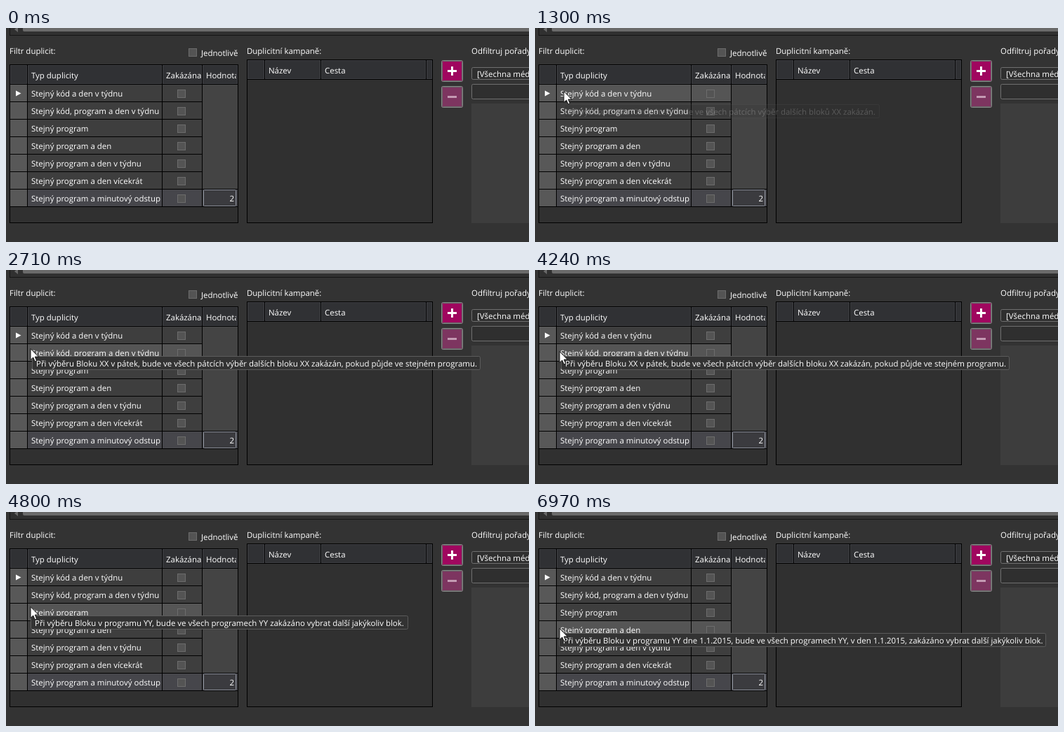
An HTML page for the animation above (8000 ms loop, 745 px wide and 306 px high).

```html
<!DOCTYPE html>
<html lang="cs">
<head>
<meta charset="utf-8">
<title>Filtr duplicit</title>
<style>
html, body { margin: 0; width: 100%; height: 100%; overflow: hidden; background: #333; }
svg { display: block; width: 745px; height: 306px; }
text { font: 11.45px "Open Sans", "Noto Sans", sans-serif; fill: #fff; text-rendering: geometricPrecision; white-space: pre; }
.check { fill: #545454; stroke: #6c6c6c; }
.field { fill: #2f2f2f; stroke: #707070; }
.head { fill: #303134; stroke: #3d3e42; }
.tip rect { fill: #333; stroke: #5c5c5c; }

.hover, .tip, #cursor, #thumbHot { animation: 8s step-end infinite; }
.hover, .tip, #thumbHot { opacity: 0; }
#cursor { animation-name: cursor; }
#thumbHot { animation-name: thumb; }
#hover0 { animation-name: hover0; }
#hover1 { animation-name: hover1; }
#hover2 { animation-name: hover2; }
#hover3 { animation-name: hover3; }
#tip0 { animation-name: tip0; }
#tip1 { animation-name: tip1; }
#tip2 { animation-name: tip2; }
#tip3 { animation-name: tip3; }

@keyframes thumb { 0%, 8% { opacity: 0 } 6.625% { opacity: 1 } 100% { opacity: 0 } }

@keyframes hover0 { 0%, 31.25%, 100% { opacity: 0 } 10.75% { opacity: 1 } }
@keyframes hover1 { 0%, 55.75%, 100% { opacity: 0 } 31.25% { opacity: 1 } }
@keyframes hover2 { 0%, 83.125%, 100% { opacity: 0 } 55.75% { opacity: 1 } }
@keyframes hover3 { 0% { opacity: 0 } 83.125%, 100% { opacity: 1 } }

@keyframes tip0 { 0%, 31.25%, 100% { opacity: 0 } 16.25% { opacity: .2 } 17.625% { opacity: .7 } 19% { opacity: 1 } }
@keyframes tip1 { 0%, 55.75%, 100% { opacity: 0 } 32.5% { opacity: .6 } 33.875% { opacity: 1 } }
@keyframes tip2 { 0%, 83.125%, 100% { opacity: 0 } 57.125% { opacity: .4 } 58.5% { opacity: .85 } 60% { opacity: 1 } }
@keyframes tip3 { 0% { opacity: 0 } 84.5% { opacity: .4 } 85.75% { opacity: .85 } 87.125%, 100% { opacity: 1 } }

@keyframes cursor {
  0% { transform: translate(-50px, 0) }
  2.375% { transform: translate(728px, 206px) }
  3.75% { transform: translate(560px, 90px) }
  5.125% { transform: translate(400px, 25px) }
  6.625% { transform: translate(230px, 3px) }
  8% { transform: translate(96px, 14px) }
  9.25% { transform: translate(60px, 52px) }
  10.75% { transform: translate(43px, 84px) }
  12% { transform: translate(41px, 90px) }
  13.5% { transform: translate(41px, 91px) }
  27.25% { transform: translate(41px, 95px) }
  28.625% { transform: translate(39px, 99px) }
  29.875% { transform: translate(38px, 103px) }
  31.25% { transform: translate(36px, 108px) }
  32.5% { transform: translate(35px, 111px) }
  33.875% { transform: translate(35px, 113px) }
  53% { transform: translate(35px, 117px) }
  54.375% { transform: translate(35px, 124px) }
  55.75% { transform: translate(35px, 131px) }
  57.125% { transform: translate(35px, 134px) }
  58.5% { transform: translate(35px, 135px) }
  60% { transform: translate(35px, 136px) }
  79% { transform: translate(35px, 140px) }
  80.375% { transform: translate(35px, 147px) }
  81.75% { transform: translate(35px, 153px) }
  83.125% { transform: translate(35px, 159px) }
  84.5% { transform: translate(35px, 163px) }
  85.75% { transform: translate(35px, 166px) }
  87.125%, 100% { transform: translate(35px, 167px) }
}
</style>
</head>
<body>
<svg id="stage" viewBox="0 0 745 306"></svg>
<script>
const rowNames = [
  "Stejný kód a den v týdnu",
  "Stejný kód, program a den v týdnu",
  "Stejný program",
  "Stejný program a den",
  "Stejný program a den v týdnu",
  "Stejný program a den vícekrát",
  "Stejný program a minutový odstup",
];
// left, top, right edge, text
const tips = [
  [41, 109, 491, "Při výběru Bloku XX v pátek, bude ve všech pátcích výběr dalších bloků XX zakázán."],
  [37, 123, 676, "Při výběru Bloku XX v pátek, bude ve všech pátcích výběr dalších bloku XX zakázán, pokud půjde ve stejném programu."],
  [35, 148, 573, "Při výběru Bloku v programu YY, bude ve všech programech YY zakázáno vybrat další jakýkoliv blok."],
  [34, 173, 728, "Při výběru Bloku v programu YY dne 1.1.2015, bude ve všech programech YY, v den 1.1.2015, zakázáno vybrat další jakýkoliv blok."],
];

const rect = (x, y, w, h, fill, extra = "") =>
  `<rect x="${x}" y="${y}" width="${w}" height="${h}" fill="${fill}" ${extra}/>`;
const box = (x, y, w, h, cls, r = 0) =>
  `<rect class="${cls}" x="${x + .5}" y="${y + .5}" width="${w - 1}" height="${h - 1}" rx="${r}"/>`;
const label = (x, y, s, extra = "") => `<text x="${x}" y="${y}" ${extra}>${s}</text>`;
const check = (x, y) => box(x, y, 12, 12, "check");

// Header cells lie between neighbouring edges, one dark pixel apart.
const header = (y, h, edges) =>
  edges.slice(1).map((right, i) => box(edges[i] + 1, y, right - edges[i] - 1, h, "head")).join("");

const cells = (y, fill) => rect(31, y, 191, 24, fill) + rect(223, y, 56, 24, fill);

const row = (name, i) => {
  const y = 81 + 25 * i;
  return rect(6, y, 24, 24, "#585858")
    + cells(y, i === 6 ? "#46464b" : "#3e3e3e")
    + (i < 4 ? `<g class="hover" id="hover${i}">${cells(y, "#555")}</g>` : "")
    + label(36, y + 17, name)
    + check(244, y + 7);
};

const filterTable = () =>
  rect(5, 52, 326, 227, "#000")
  + header(53, 27, [5, 30, 222, 279, 330])
  + rect(6, 256, 324, 22, "#303030")
  + rect(280, 81, 50, 149, "#444")
  + rect(280, 231, 50, 24, "#46464b")
  + rowNames.map(row).join("")
  + label(36, 72, "Typ duplicity") + label(228, 72, "Zakázána")
  + `<svg x="280" y="53" width="48" height="28">${label(5, 19, "Hodnota")}</svg>`
  + `<path d="M14 89.5l7.5 4-7.5 4z" fill="#fff"/>`
  + `<rect x="281.5" y="231.5" width="46" height="23" rx="1" fill="#3b3b3f" stroke="#8d919c"/>`
  + label(325, 248, "2", 'text-anchor="end"');

const campaignTable = () =>
  rect(343, 45, 265, 234, "#000")
  + header(46, 27, [343, 368, 448, 598, 607])
  + rect(344, 74, 263, 204, "#303030")
  + label(374, 65, "Název") + label(454, 65, "Cesta");

const button = (y, fill, ink, sign) =>
  `<rect x="620.5" y="${y + .5}" width="30" height="30" rx="2" fill="${fill}" stroke="#868686"/>`
  + `<rect x="621.5" y="${y + 1.5}" width="28" height="28" rx="1" fill="none" stroke="#666"/>`
  + `<path d="${sign}" transform="translate(635.5 ${y + 15.5})" stroke="${ink}" stroke-width="3"/>`;

const tip = ([x, y, right, s], i) =>
  `<g class="tip" id="tip${i}">${box(x, y, right - x, 20, "", 2)}${label(x + 6, y + 15, s)}</g>`;

document.getElementById("stage").innerHTML =
  rect(0, 0, 745, 306, "#333")
  + rect(5, 0, 740, 11, "#151515") + rect(6, 0, 739, 10, "#303030")
  + `<path d="M17 -2v8l-5-4z" fill="#686868"/>`
  + rect(24, -4, 730, 9, "#6a6a6a", 'rx="2"')
  + rect(24, -4, 730, 9, "#7c7c7c", 'rx="2" id="thumbHot"')
  + label(5, 37, "Filtr duplicit:")
  + check(260, 29) + label(278, 40, "Jednotlivě")
  + label(343, 37, "Duplicitní kampaně:")
  + label(663, 37, "Odfiltruj pořady")
  + filterTable() + campaignTable()
  + button(46, "#a0065f", "#fff", "M-6.5 0H6.5M0-6.5V6.5")
  + button(83, "#7d3560", "#c49ab3", "M-6.5 0H6.5")
  + box(663, 56, 100, 18, "field", 2) + label(671, 70, "[Všechna média]")
  + box(663, 80, 100, 22, "field", 2)
  + rect(663, 108, 82, 171, "#3d3d3d")
  + tips.map(tip).join("")
  + `<path id="cursor" d="M0-.5V15.5L3.7 12 6.2 17.8 8.7 16.7 6.3 11.1H11.4z" fill="#fff" stroke="#111"/>`;
</script>
</body>
</html>
```
